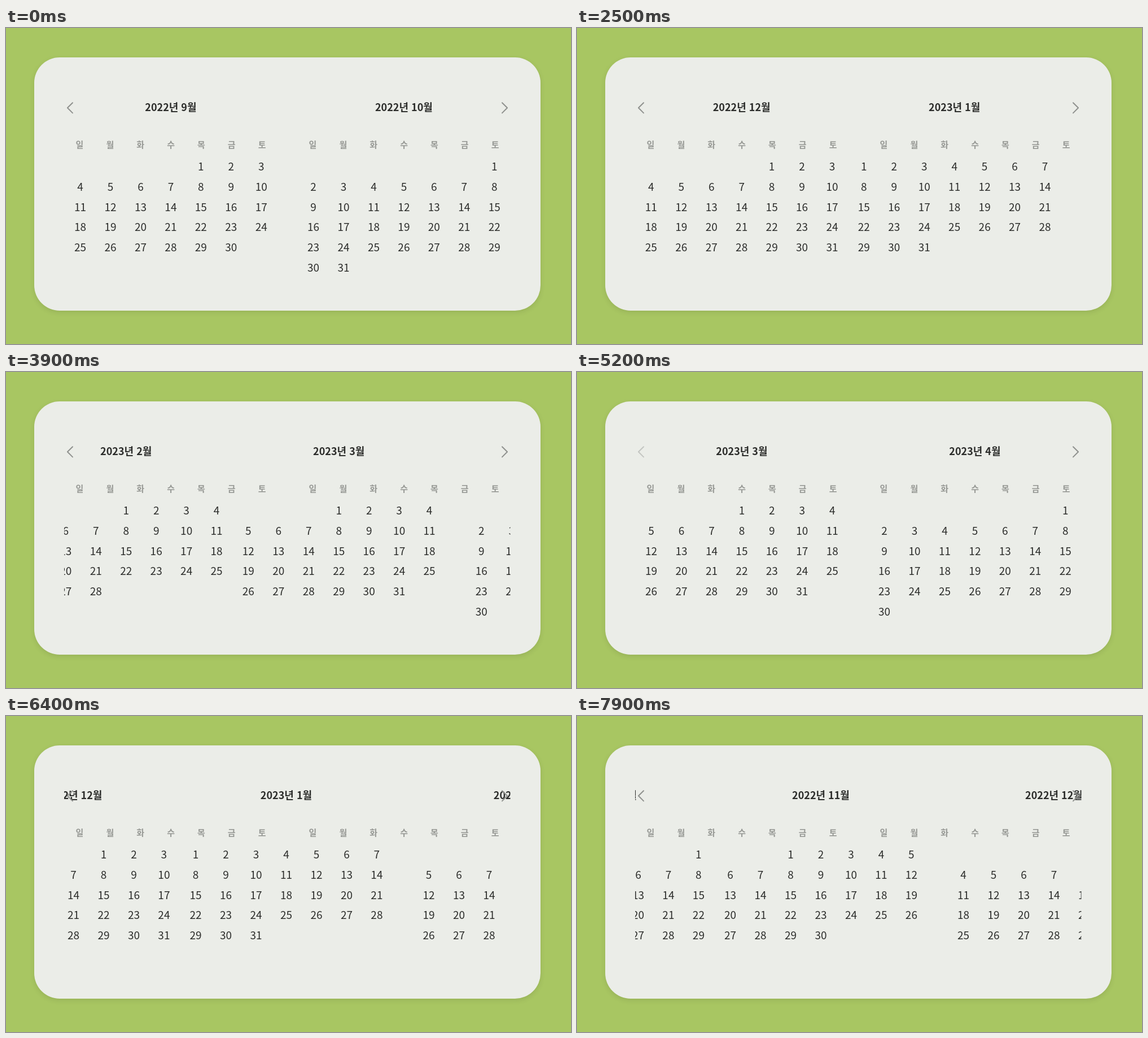
Animation, 1001 px wide and 559 px high, one loop 8000 ms. Source, as an HTML page:

```html
<!DOCTYPE html>
<html lang="ko">
<head>
<meta charset="utf-8">
<title>달력</title>
<style>
  html, body { margin: 0; width: 100%; height: 100%; overflow: hidden; background: #a8c662; }
  .card {
    position: absolute; left: 50px; top: 52px; width: 897px; height: 448px;
    border-radius: 45px; background: #ebede8; box-shadow: 0 3px 10px rgba(0, 0, 0, .1);
  }
  svg { position: absolute; left: 0; top: 0; display: block; }
  text { font-family: "Noto Sans CJK KR", "Noto Sans CJK", "Noto Sans KR", sans-serif; text-anchor: middle; }
  .title { font-size: 18px; font-weight: 700; fill: #2b2c2a; }
  .day { font-size: 19px; fill: #2b2c2a; }
  .week { font-size: 15px; font-weight: 700; fill: #969894; }
  .arrow { fill: none; stroke: #8f918e; stroke-width: 2; stroke-linecap: round; stroke-linejoin: round; }
  .arrow.pressed { stroke: #c3c5c1; }
</style>
</head>
<body>
<div class="card"></div>
<svg id="stage" width="1001" height="559" viewBox="0 0 1001 559">
  <defs><clipPath id="view"><rect x="103" y="100" width="790.5" height="380"/></clipPath></defs>
  <g id="weeks"></g>
  <g clip-path="url(#view)"><g id="track"></g></g>
  <path id="prev" class="arrow" d="M118 132.2 L108.9 141.3 L118 150.4"/>
  <path id="next" class="arrow" d="M879 132.2 L888.1 141.3 L879 150.4"/>
</svg>
<script>
  const LOOP = 8000, TICK = 100, SLIDE = 500;
  const PAGE = 790, SECOND = 413, COL = 53.47, ROW = 35.9, LEFT = 131.5;

  // start time, page left, page entered
  const slides = [
    [1149.5, 0, 1], [2347.5, 1, 2], [3719.5, 2, 3],
    [5210, 3, 2], [6308, 2, 1], [7827, 1, 0]
  ];
  // button, pressed from, pressed until
  const presses = [
    ['next', 1000, 1200], ['next', 2200, 2300], ['next', 3600, 3700],
    ['prev', 5200, 5300], ['prev', 7700, 7900]
  ];

  const $ = id => document.getElementById(id);
  const track = $('track');

  function label(parent, cls, x, y, str) {
    const el = document.createElementNS('http://www.w3.org/2000/svg', 'text');
    el.setAttribute('class', cls);
    el.setAttribute('x', x.toFixed(2));
    el.setAttribute('y', y.toFixed(2));
    el.textContent = str;
    parent.append(el);
  }

  function addMonth(index) {
    const first = new Date(Date.UTC(2022, 8 + index, 1));
    const year = first.getUTCFullYear(), month = first.getUTCMonth();
    const count = new Date(Date.UTC(year, month + 1, 0)).getUTCDate();
    const lead = first.getUTCDay();
    const x = LEFT + Math.floor(index / 2) * PAGE + index % 2 * SECOND;
    label(track, 'title', x + 3 * COL, 147, `${year}년 ${month + 1}월`);
    for (let d = 1; d <= count; d++) {
      const cell = lead + d - 1;
      label(track, 'day', x + cell % 7 * COL, 251.7 + Math.floor(cell / 7) * ROW, d);
    }
  }

  for (let i = 0; i < 8; i++) addMonth(i);
  for (const x of [130.5, 543.5])
    [...'일월화수목금토'].forEach((name, i) => label($('weeks'), 'week', x + i * 53.85, 211.6, name));

  // cubic-bezier(.25, .1, .25, 1)
  function ease(t) {
    if (t <= 0) return 0;
    if (t >= 1) return 1;
    const curve = (u, a, b) => 3 * u * (1 - u) ** 2 * a + 3 * u * u * (1 - u) * b + u ** 3;
    let lo = 0, hi = 1;
    for (let i = 0; i < 24; i++) {
      const mid = (lo + hi) / 2;
      if (curve(mid, .25, .25) < t) lo = mid; else hi = mid;
    }
    return curve(lo, .1, 1);
  }

  function draw(time) {
    const t = Math.floor(time % LOOP / TICK) * TICK;
    let page = 0;
    for (const [start, from, to] of slides)
      if (t >= start) page = from + (to - from) * ease((t - start) / SLIDE);
    track.setAttribute('transform', `translate(${(-page * PAGE).toFixed(2)} 0)`);
    for (const id of ['prev', 'next'])
      $(id).classList.toggle('pressed', presses.some(([b, on, off]) => b === id && t >= on && t < off));
  }

  const begin = performance.now();
  function loop() {
    draw(performance.now() - begin);
    requestAnimationFrame(loop);
  }
  loop();
</script>
</body>
</html>
```
